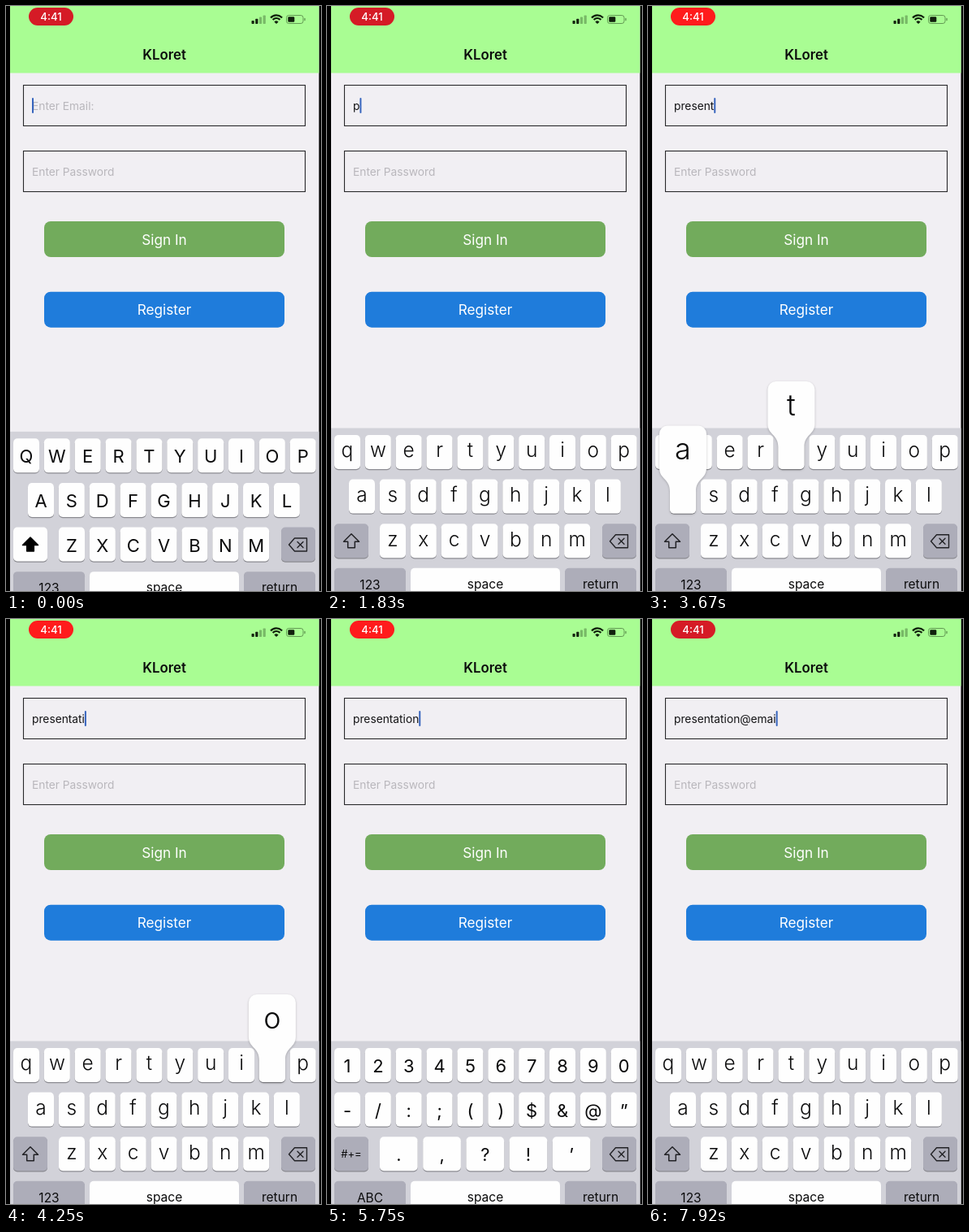
Animation, 388 px wide and 720 px high, one loop 8 s. Source, as an HTML page with a canvas:

```html
<!DOCTYPE html>
<html lang="en">
<head>
<meta charset="utf-8">
<title>Sign in</title>
<style>
html, body { margin: 0; width: 100%; height: 100%; overflow: hidden; background: #000; }
canvas { display: block; width: 388px; height: 720px; }
</style>
</head>
<body>
<canvas id="stage"></canvas>
<script>
const W = 388, H = 720, LOOP = 8000;
const canvas = document.getElementById('stage');
const ctx = canvas.getContext('2d');
const ratio = window.devicePixelRatio || 1;
canvas.width = W * ratio;
canvas.height = H * ratio;

const FONT = 'Inter, "Open Sans", sans-serif';
const WHITE = '#fefefe', GREY = '#adadb9', INK = '#0b0b0c', SHADOW = '#8b8b91';
const KEY_W = 32, KEY_H = 42, PITCH = 37.86, ROW = 54.6, KEYS_TOP = 528;

// Touch-down time of every typed character
const strokes = [
  ['p', 1640], ['r', 2030], ['e', 2290], ['s', 2600], ['e', 2860], ['n', 3180],
  ['t', 3520], ['a', 3610], ['t', 3830], ['i', 4030], ['o', 4220], ['n', 4410],
  ['@', 6190], ['e', 6960], ['m', 7210], ['a', 7450], ['i', 7700]
];
const COMMIT = 110, RELEASE = 180;
const SHIFT_OFF = 1000, TO_NUMBERS = 5220, TO_LETTERS = 6600;

const layouts = {
  upper: ['QWERTYUIOP', 'ASDFGHJKL', 'ZXCVBNM'],
  lower: ['qwertyuiop', 'asdfghjkl', 'zxcvbnm'],
  numbers: ['1234567890', '-/:;()$&@”', '.,?!’']
};

const clamp = (v, lo, hi) => Math.min(hi, Math.max(lo, v));

function modeAt(t) {
  if (t < SHIFT_OFF) return 'upper';
  return t >= TO_NUMBERS && t < TO_LETTERS ? 'numbers' : 'lower';
}

function box(x, y, w, h, r, fill) {
  ctx.beginPath();
  ctx.roundRect(x, y, w, h, r);
  ctx.fillStyle = fill;
  ctx.fill();
}

function text(str, x, y, size, color = INK, weight = 400, align = 'center') {
  ctx.font = `${weight} ${size}px ${FONT}`;
  ctx.textAlign = align;
  ctx.fillStyle = color;
  ctx.fillText(str, x, y);
}

function poly(points, close = true) {
  ctx.beginPath();
  points.forEach(([x, y]) => ctx.lineTo(x, y));
  if (close) ctx.closePath();
}

function drawStatus(t) {
  const wave = Math.cos((t / 1020 - 0.4) * 2 * Math.PI);
  const glow = clamp((wave + 0.62) / 0.3, 0, 1);
  const red = Math.round(213 + 42 * glow);
  box(28, 2, 55, 22, 11, `rgb(${red}, 27, ${Math.round(38 - 10 * glow)})`);
  text('4:41', 55.5, 17.8, 13.2, '#fff', 500);

  for (let i = 0; i < 4; i++) {
    const h = 4 + i * 2.2;
    box(302.5 + i * 4.7, 22 - h, 3.2, h, 0.8, i < 2 ? '#14230f' : '#78b967');
  }

  ctx.strokeStyle = '#10200c';
  ctx.lineWidth = 2.2;
  for (const r of [9.6, 6]) {
    ctx.beginPath();
    ctx.arc(333, 21, r, -Math.PI * 0.76, -Math.PI * 0.24);
    ctx.stroke();
  }
  ctx.beginPath();
  ctx.moveTo(333, 22);
  ctx.arc(333, 22, 3.6, -Math.PI * 0.76, -Math.PI * 0.24);
  ctx.fillStyle = '#10200c';
  ctx.fill();

  ctx.beginPath();
  ctx.roundRect(345.5, 11.5, 20.5, 10, 2.8);
  ctx.strokeStyle = '#639a54';
  ctx.lineWidth = 1;
  ctx.stroke();
  box(347.3, 13.3, 8, 6.4, 1.3, '#10200c');
  box(367.3, 14.7, 1.4, 3.6, 0.7, '#639a54');
}

function drawField(y) {
  ctx.strokeStyle = '#29292b';
  ctx.lineWidth = 1.1;
  ctx.strokeRect(21.5, y + 0.5, 347, 50);
}

function drawButton(label, y, color) {
  box(47, y, 296, 44, 8, color);
  text(label, 195, y + 28.6, 17.2, '#fff');
}

function drawForm(t) {
  ctx.fillStyle = '#f1eff3';
  ctx.fillRect(5, 0, 380.5, H);
  ctx.fillStyle = '#a9fd93';
  ctx.fillRect(5, 0, 380.5, 82.5);
  drawStatus(t);
  text('KLoret', 195, 66, 16.8, INK, 600);

  drawField(97);
  drawField(178);
  const done = strokes.filter(([, down]) => t >= down + COMMIT);
  const typed = done.map(([ch]) => ch).join('');
  if (typed) text(typed, 32, 127.6, 13.75, '#151517', 400, 'left');
  else text('Enter Email:', 32, 127.6, 13.75, '#b9b7bc', 400, 'left');

  ctx.font = `400 13.75px ${FONT}`;
  const caretX = 32 + ctx.measureText(typed).width;
  const last = done.length ? done[done.length - 1][1] + COMMIT : 0;
  if ((t - last) % 1000 < 600) box(caretX, 113, 2, 19, 1, '#3664bd');

  text('Enter Password', 32, 208.6, 13.75, '#b9b7bc', 400, 'left');
  drawButton('Sign In', 265, '#72ab5c');
  drawButton('Register', 351.7, '#1f7cdb');
}

function drawKey(x, y, w, fill) {
  box(x, y + 1.2, w, KEY_H, 5, SHADOW);
  box(x, y, w, KEY_H, 5, fill);
}

function keysFor(mode) {
  const keys = [];
  layouts[mode].forEach((row, r) => {
    const wide = mode === 'numbers' && r === 2;
    const indent = mode === 'numbers' && r === 1 ? 0 : [0, 18, 56][r];
    [...row].forEach((ch, i) => keys.push({
      ch,
      x: 9 + indent + i * (wide ? 53.2 : PITCH),
      y: KEYS_TOP + r * ROW,
      w: wide ? 46.7 : KEY_W
    }));
  });
  return keys;
}

function drawShift(y, active) {
  const pts = [[30, 12.5], [39.5, 22], [34.3, 22], [34.3, 29.5],
    [25.7, 29.5], [25.7, 22], [20.5, 22]];
  poly(pts.map(([x, dy]) => [x, y + dy]));
  ctx.lineJoin = 'round';
  ctx.lineWidth = 1.5;
  ctx.strokeStyle = ctx.fillStyle = active ? '#000' : '#222226';
  if (active) ctx.fill();
  ctx.stroke();
}

function drawBackspace(y) {
  const pts = [[348.5, 21.5], [355.5, 13.5], [370.5, 13.5], [370.5, 29.5], [355.5, 29.5]];
  poly(pts.map(([x, dy]) => [x, y + dy]));
  ctx.lineJoin = ctx.lineCap = 'round';
  ctx.lineWidth = 1.4;
  ctx.strokeStyle = '#222226';
  ctx.stroke();
  for (const s of [-1, 1]) {
    poly([[359, y + 21.5 - 3.5 * s], [366, y + 21.5 + 3.5 * s]], false);
    ctx.stroke();
  }
}

function drawPopup({ ch, x, y, w }) {
  const r = x + w, bottom = y + KEY_H;
  const left = clamp(x + w / 2 - 29, 7, 325), right = left + 58;
  const top = y - 66;
  ctx.beginPath();
  ctx.moveTo(x, bottom - 5);
  ctx.lineTo(x, y + 15);
  ctx.bezierCurveTo(x, y - 1, left, y, left, y - 14);
  ctx.arcTo(left, top, left + 10, top, 10);
  ctx.arcTo(right, top, right, top + 10, 10);
  ctx.lineTo(right, y - 14);
  ctx.bezierCurveTo(right, y, r, y - 1, r, y + 15);
  ctx.arcTo(r, bottom, r - 5, bottom, 5);
  ctx.arcTo(x, bottom, x, bottom - 5, 5);
  ctx.closePath();
  ctx.save();
  ctx.shadowColor = 'rgba(0, 0, 0, 0.22)';
  ctx.shadowBlur = 3 * ratio;
  ctx.shadowOffsetY = ratio;
  ctx.fillStyle = WHITE;
  ctx.fill();
  ctx.restore();
  text(ch, (left + right) / 2, y - 24.5, 36, INK, 300);
}

function drawKeyboard(t) {
  const mode = modeAt(t);
  const keys = keysFor(mode);
  const numbers = mode === 'numbers', upper = mode === 'upper';
  const slide = 4.4 * (1 - clamp(t / 170, 0, 1)) ** 2;
  ctx.save();
  ctx.translate(0, slide);
  ctx.fillStyle = '#d2d2d9';
  ctx.fillRect(5, 519.5, 380.5, 210);

  for (const { ch, x, y, w } of keys) {
    drawKey(x, y, w, WHITE);
    const lower = mode === 'lower';
    text(ch, x + w / 2, y + (lower ? 27.3 : 30), lower ? 24.5 : 22, INK, lower ? 300 : 400);
  }

  const third = KEYS_TOP + 2 * ROW, fourth = KEYS_TOP + 3 * ROW;
  drawKey(9, third, 42, upper ? WHITE : GREY);
  if (numbers) text('#+=', 30, third + 26, 13, INK);
  else drawShift(third, upper);
  drawKey(339, third, 42, GREY);
  drawBackspace(third);

  drawKey(9, fourth, 88, GREY);
  drawKey(103, fourth, 184, WHITE);
  drawKey(293, fourth, 88, GREY);
  text(numbers ? 'ABC' : '123', 53, fourth + 26.3, 15.5);
  text('space', 195, fourth + 25, 15.5);
  text('return', 337, fourth + 25, 15.5);

  for (const [ch, down] of strokes) {
    if (t < down || t >= down + RELEASE) continue;
    const key = keys.find(k => k.ch === ch);
    if (key) drawPopup(key);
  }
  ctx.restore();
}

function draw(t) {
  ctx.setTransform(ratio, 0, 0, ratio, 0, 0);
  ctx.fillStyle = '#000';
  ctx.fillRect(0, 0, W, H);
  drawForm(t);
  drawKeyboard(t);
}

const start = performance.now();
function tick() {
  draw((performance.now() - start) % LOOP);
  requestAnimationFrame(tick);
}
tick();
</script>
</body>
</html>
```
